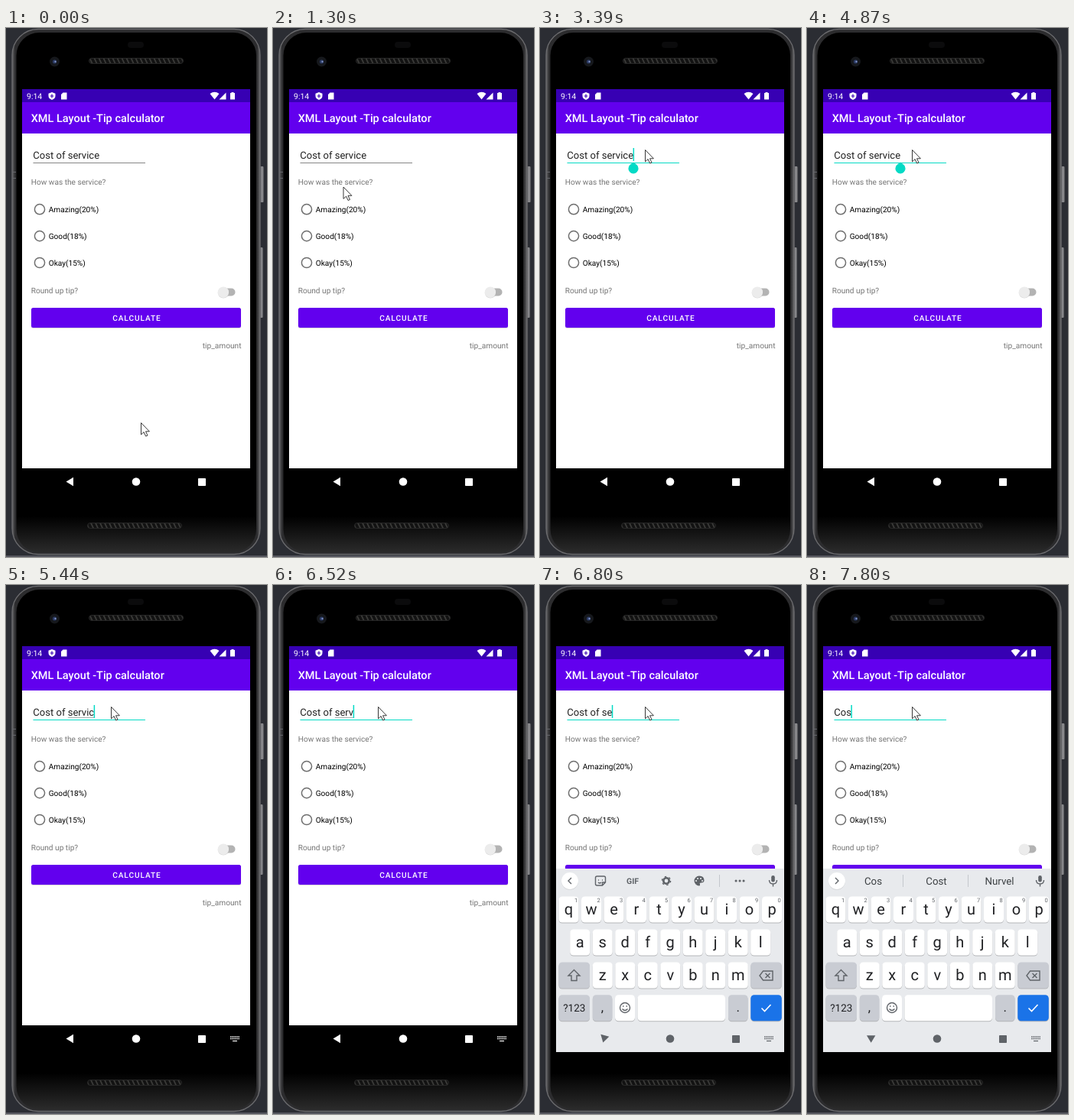
Write an HTML page that moves like this. It is 341 px wide and 692 px high and loops after 8000 ms.

```html
<!DOCTYPE html>
<html lang="en">
<head>
<meta charset="utf-8">
<title>Tip calculator</title>
<style>
html, body { margin: 0; width: 100%; height: 100%; overflow: hidden; background: #2b2d33; }
svg { display: block; width: 100%; height: 100%; font-family: Roboto, sans-serif; text-rendering: geometricPrecision; }
.body { font-size: 10.15px; }
.grey { fill: #757575; }
.mid { text-anchor: middle; }
.line { fill: none; stroke: #5f6368; stroke-width: 1.4; }
</style>
</head>
<body>
<svg viewBox="0 0 341 692">
  <defs>
    <linearGradient id="rim">
      <stop offset="0" stop-color="#6a6a6c"/><stop offset=".012" stop-color="#2c2c2e"/>
      <stop offset=".988" stop-color="#2c2c2e"/><stop offset="1" stop-color="#6a6a6c"/>
    </linearGradient>
    <linearGradient id="face" x2="0" y2="1">
      <stop offset=".93" stop-color="#000"/><stop offset="1" stop-color="#2b2b2b"/>
    </linearGradient>
    <linearGradient id="button">
      <stop stop-color="#333437"/><stop offset=".6" stop-color="#98989b"/><stop offset="1" stop-color="#4a4b4f"/>
    </linearGradient>
    <pattern id="mesh" width="6" height="8" patternUnits="userSpaceOnUse" patternTransform="skewX(25)">
      <rect width="6" height="8" fill="#121212"/><rect width="2" height="8" fill="#3a3a38"/>
    </pattern>
    <clipPath id="screen"><rect x="21" y="80" width="298" height="531"/></clipPath>
  </defs>

  <!-- phone -->
  <rect width="341" height="692" fill="#2b2d33"/>
  <rect y="690" width="341" height="2" fill="#55565e"/>
  <g fill="url(#button)">
    <rect x="331" y="181" width="6" height="47" rx="1.500"/>
    <rect x="331" y="287" width="5" height="92" rx="1.500"/>
  </g>
  <rect x="8" y="1.500" width="324" height="687" rx="34" fill="url(#rim)" stroke="#6b6b6e" stroke-width="1.300"/>
  <rect x="13.500" y="6" width="313.500" height="680" rx="30" fill="url(#face)"/>
  <path d="M8 188.500h5M8 196.500h5" stroke="#65666b"/>
  <rect x="159" y="18" width="21" height="8" rx="4" fill="#0b0b0c"/>
  <circle cx="63.500" cy="44" r="6.500" fill="#16181c"/>
  <circle cx="63.500" cy="44" r="2.600" fill="#2b3a63"/>
  <circle cx="64.500" cy="44" r="1.200" fill="#7d8fc0"/>
  <g fill="url(#mesh)" stroke="#262626">
    <rect x="108.500" y="39.500" width="123" height="7" rx="3.500"/>
    <rect x="106.500" y="647.500" width="123" height="7" rx="3.500"/>
  </g>

  <!-- app -->
  <g clip-path="url(#screen)">
    <rect x="21" y="80" width="298" height="496" fill="#fff"/>
    <rect x="21" y="97" width="298" height="41" fill="#6200ee"/>
    <rect x="21" y="80" width="298" height="17" fill="#3700b3"/>
    <g fill="#fff">
      <text x="27" y="93" font-size="10.500">9:14</text>
      <path d="M60 84l4.500 1.700v3q0 3.700-4.500 5.300-4.500-1.600-4.500-5.300v-3z"/>
      <path d="M74.500 84.500h5v9h-7.500v-6.500z"/>
      <path d="M272.500 93.500l-6-7.500q6-4.500 12 0z"/>
      <path d="M287.500 84.500v9h-9z"/>
      <path d="M294.500 84h3v1h1.500v8.500h-6v-8.500h1.500z"/>
      <text x="32.700" y="123.300" font-size="14.500" font-weight="500">XML Layout -Tip calculator</text>
    </g>
    <path d="M60 86.500v5M57.600 89h4.800" stroke="#3700b3" stroke-width="1.200"/>

    <text id="field" x="35.300" y="171" font-size="13.050" fill="#212121"></text>
    <path id="compose" stroke="#8a8a8a" stroke-width=".7"/>
    <path id="base" d="M35.500 176.500H182"/>
    <path id="caret" stroke="#03dac5" stroke-width="1.500"/>
    <path id="handle" d="M122 175.500l4.800 3.800a6.600 6.600 0 1 1-9.600 0z" fill="#03dac5"/>

    <g class="body">
      <text class="grey" x="32.700" y="205">How was the service?</text>
      <g id="radios"></g>
      <text class="grey" x="32.700" y="347">Round up tip?</text>
      <text class="grey" x="307.500" y="419" text-anchor="end">tip_amount</text>
    </g>
    <rect x="279" y="340.500" width="20.500" height="10" rx="5" fill="#b3b3b3"/>
    <circle cx="284" cy="346.300" r="7.300" fill="#000" opacity=".14"/>
    <circle cx="284" cy="345.700" r="7.200" fill="#ececec"/>
    <rect x="33" y="367" width="274" height="26" rx="2.500" fill="#000" opacity=".14"/>
    <rect x="33" y="366" width="274" height="26" rx="2.500" fill="#6200ee"/>
    <text class="mid body" x="170.900" y="383" font-weight="500" letter-spacing=".9" fill="#fff">CALCULATE</text>

    <!-- keyboard -->
    <g id="board">
      <rect x="21" y="371" width="298" height="266" fill="#e8eaed"/>
      <circle cx="39" cy="387.600" r="11" fill="#000" opacity=".12"/>
      <circle cx="39" cy="387" r="11" fill="#fff"/>
      <path id="chevron" class="line"/>
      <g id="tools">
        <path class="line" d="M74.500 381h9q2 0 2 2v6l-4 4h-7q-2 0-2-2v-8q0-2 2-2zM85 389h-3.500v3.500M76 386h1M81 386h1M76 389q2 2 4 0"/>
        <text class="mid" x="121" y="391" font-size="10.500" font-weight="700" fill="#5f6368">GIF</text>
        <circle class="line" cx="165" cy="387" r="3.700" style="stroke-width:2.600"/>
        <circle class="line" cx="165" cy="387" r="5.600" stroke-dasharray="2.400 3.464"/>
        <path fill="#5f6368" d="M208 380.500q6.500 0 6.500 6 0 3-4 3-2.500 0-1.500 2 .5 2-1 2a6.500 6.500 0 0 1 0-13z"/>
        <path d="M204 387h.1M206 384h.1M210 384h.1M212 387h.1" stroke="#e8eaed" stroke-width="2" stroke-linecap="round"/>
        <path d="M234.500 379v16" stroke="#c4c7cc"/>
        <path d="M256 387h.1M261 387h.1M266 387h.1" stroke="#5f6368" stroke-width="3" stroke-linecap="round"/>
      </g>
      <g id="words" class="mid" font-size="13.300" fill="#3c4043">
        <text x="86.500" y="392">Cos</text><text x="169" y="392">Cost</text><text x="251.500" y="392">Nurvel</text>
        <path d="M125.500 379v16M210.500 379v16" stroke="#c4c7cc"/>
      </g>
      <rect x="302.200" y="380" width="4.600" height="8.500" rx="2.300" fill="#5f6368"/>
      <path class="line" d="M299.500 386q0 5 5 5t5-5M304.500 391v3.500"/>
      <g id="keys"></g>
      <path class="line" d="M44.500 503.500l7.500 7.500h-4v6.500h-7v-6.500h-4z"/>
      <path class="line" d="M287 511l4.500-6h12.500v12h-12.500zM294.500 508l6 6M300.500 508l-6 6"/>
      <circle class="line" cx="111" cy="553" r="6.500"/>
      <path class="line" d="M108 551h1.500M112.500 551h1.500M107.500 554.500q3.500 4 7 0"/>
      <path d="M289.500 553.500l4 4 8-8.500" fill="none" stroke="#fff" stroke-width="1.600"/>
    </g>

    <!-- navigation -->
    <g id="nav">
      <path id="back" d="M78.500 593.500l9.500-5.700v11.400z"/>
      <circle cx="170" cy="593.500" r="5.300"/>
      <rect x="251" y="589" width="10" height="10" rx=".8"/>
      <g id="switcher">
        <path d="M293 591h12M293 593.500h12" fill="none" stroke-width="1.400" stroke-dasharray="1.400 .7"/>
        <path d="M296 596.500h6" stroke-width="1.200"/>
      </g>
    </g>
  </g>
  <path id="mouse" d="M0 0v15.400l3.600-3.300 2.500 5.400 2.400-1-2.500-5.200h4.900z" fill="#fff" stroke="#222" stroke-width=".9"/>
</svg>
<script>
const $ = id => document.getElementById(id);
const show = (id, on) => $(id).setAttribute('opacity', +on);
const set = (id, attrs) => { for (const k in attrs) $(id).setAttribute(k, attrs[k]); };

$('radios').innerHTML = ['Amazing(20%)', 'Good(18%)', 'Okay(15%)'].map((label, i) => {
  const y = 237.2 + i * 34.9;
  return `<circle cx="44" cy="${y}" r="6.600" fill="none" stroke="#6f6f6f" stroke-width="1.500"/>
    <text x="55.700" y="${y + 3.8}">${label}</text>`;
}).join('');

function key(x, y, w, label = '', fill = '#fff', size = 20) {
  const drop = size < 20 ? 5 : 6.5;
  return `<rect x="${x}" y="${y + 1}" width="${w}" height="34" rx="4.500" fill="#000" opacity=".22"/>
    <rect x="${x}" y="${y}" width="${w}" height="34" rx="4.500" fill="${fill}"/>
    <text class="mid" x="${x + w / 2}" y="${y + 17 + drop}" font-size="${size}" fill="#202124">${label}</text>`;
}
const dim = '#c9ccd3';
let keys = '';
[['qwertyuiop', 24.5], ['asdfghjkl', 39.2], ['zxcvbnm', 68.8]].forEach(([row, x0], r) => {
  [...row].forEach((c, i) => {
    const x = x0 + i * 29.5, y = 407.5 + r * 43;
    keys += key(x, y, 26, c);
    if (!r) keys += `<text class="mid" x="${x + 22.5}" y="${y + 7.5}" font-size="7.500" fill="#5f6368">${(i + 1) % 10}</text>`;
  });
});
keys += key(24.5, 493.5, 40.5, '', dim) + key(275.3, 493.5, 40.5, '', dim)
  + key(24.5, 536.2, 40.5, '?123', dim, 13.5) + key(68.8, 536.2, 25.5, ',', dim, 17)
  + key(98, 536.2, 26) + key(127.5, 536.2, 114.5)
  + key(246, 536.2, 25.5, '.', dim, 17) + key(275.3, 536.2, 40.5, '', '#1a73e8');
$('keys').innerHTML = keys;

const pen = document.createElement('canvas').getContext('2d');
function textEnd(s) {
  pen.font = '13.05px Roboto, sans-serif';
  return 35.5 + pen.measureText(s).width;
}

const FULL = 'Cost of service';
// Each list holds [start time, values...]; a value stays until the next start.
const mousePath = [[0, 176.5, 516.5], [500, 152.5, 410], [620, 161.5, 350], [1020, 74.5, 233], [1300, 92, 208],
  [1420, 111.5, 185], [1570, 138.5, 162], [1720, 138, 159.5], [1870, 137.5, 159.5]];
const typed = [[0, 15], [5440, 14], [5810, 13], [6520, 12], [6800, 10], [6950, 9], [7070, 8],
  [7190, 6], [7310, 5], [7560, 4], [7680, 3]];
const blink = [[0, 0], [2150, 1], [2830, 0], [3390, 1], [4070, 0], [4370, 1], [4870, 0], [5290, 1], [6370, 0], [6520, 1]];
const grip = [[0, 0], [2680, .6], [2830, 1], [5440, 0]];
const turn = [[0, 0], [6800, -75], [6950, -85], [7070, -90]];
const strip = [[0, 0], [7560, .4], [7680, .8], [7800, 1]];
const at = (list, t) => list.filter(k => k[0] <= t).pop().slice(1);

function draw(t) {
  const [x, y] = at(mousePath, t);
  set('mouse', { transform: `translate(${x} ${y})` });

  const text = FULL.slice(0, at(typed, t)[0]);
  const end = textEnd(text);
  $('field').textContent = text.replace(/ /g, '\u00a0');
  set('base', { stroke: t >= 2150 ? '#03dac5' : '#858585' });
  const caretX = t < 2430 ? 35.8 : end;
  set('caret', { d: `M${caretX} 157v17` });
  show('caret', at(blink, t)[0]);
  show('handle', at(grip, t)[0]);
  set('compose', { d: `M${textEnd('Cost of ')} 173.500H${end}` });
  show('compose', t >= 5290 && t < 6800);

  const open = t >= 6670, settled = t >= 6800;
  show('board', open);
  set('board', { transform: `translate(0 ${settled ? 0 : 26})` });
  const words = at(strip, t)[0];
  show('words', words);
  show('tools', 1 - words);
  set('chevron', { d: words ? 'M37 383l4 4-4 4' : 'M41 383l-4 4 4 4' });

  const ink = open ? '#5f6368' : '#fff';
  set('nav', { fill: ink });
  set('back', { transform: `rotate(${at(turn, t)[0]} 83.7 593.500)` });
  set('switcher', { stroke: ink });
  show('switcher', t >= 5290 && (!open || settled));
}

function tick(now) {
  draw(now % 8000);
  requestAnimationFrame(tick);
}
draw(0);
requestAnimationFrame(tick);
</script>
</body>
</html>
```
